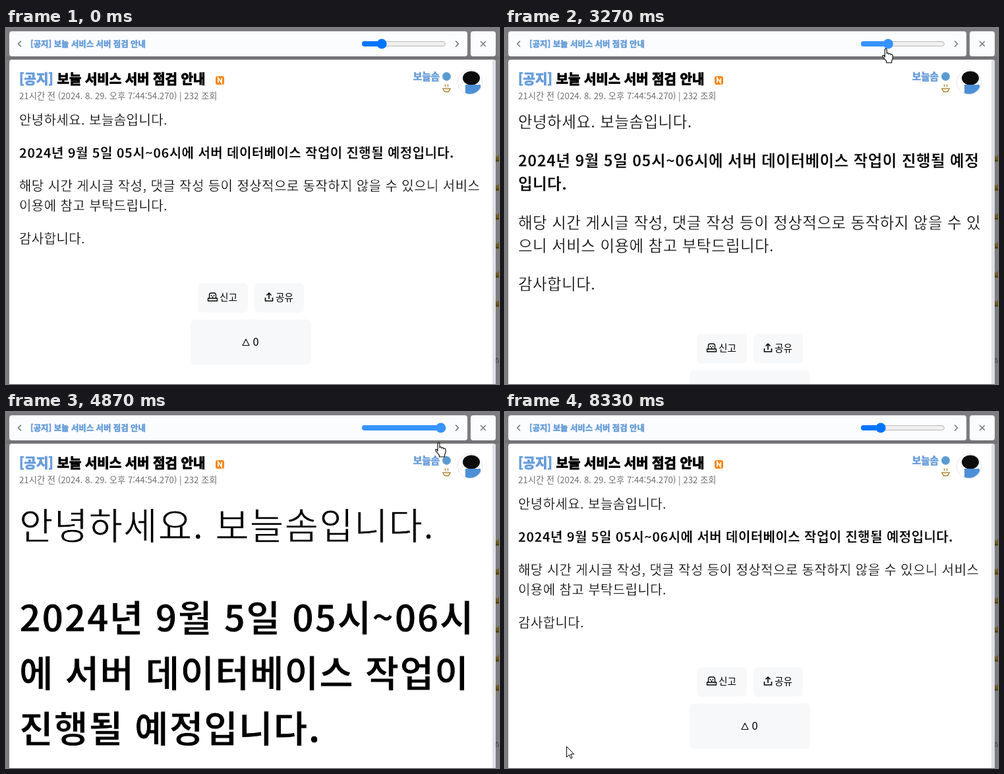
These frames come from a looping animation (748x540 px, 8390 ms). An HTML page:

```html
<!DOCTYPE html>
<html lang="ko">
<head>
<meta charset="utf-8">
<title>공지</title>
<style>
html, body { margin: 0; width: 100%; height: 100%; overflow: hidden; background: #7d7d7f; }
#stage { position: relative; width: 748px; height: 540px; overflow: hidden; }
svg { position: absolute; left: 0; top: 0; }
text, #post { font-family: 'Noto Sans CJK KR', 'Noto Sans CJK', 'Noto Sans', sans-serif; }
/* the white stroke thins the letters to a light weight */
#post {
  position: absolute; left: 20px; top: 122.3px; width: 709px; box-sizing: border-box;
  padding: .08em 0 1.59em; line-height: 1.5; letter-spacing: .021em; font-weight: 300; color: #000;
  -webkit-text-stroke: .016em #fff;
}
#post p { margin: 0 0 1em; }
#post p:last-child { margin: 0; }
#post b { font-weight: 600; }
.heavy { font-weight: 900; stroke-width: 1; paint-order: stroke; stroke-linejoin: round; }
.blue { fill: #669cda; stroke: #669cda; }
.black { fill: #000; stroke: #000; }
.line { fill: none; stroke: #6a6a6a; stroke-width: 1.3; stroke-linecap: round; stroke-linejoin: round; }
.ink { fill: none; stroke: #000; stroke-width: 1.3; stroke-linejoin: round; }
.gold { fill: none; stroke: #b5893c; stroke-width: 1.4; stroke-linecap: round; }
</style>
</head>
<body>
<div id="stage">
  <svg width="748" height="540">
    <rect width="748" height="540" fill="#7d7d7f"/>
    <rect y="43" width="748" height="5" fill="#747476"/>
    <g id="edge"></g>
    <rect x="5" y="5" width="695" height="38" rx="4" fill="#fbfcfe"/>
    <rect x="705" y="5" width="38" height="38" rx="4" fill="#fbfcfe"/>
    <rect x="5" y="48" width="738" height="520" rx="4" fill="#fff"/>
    <rect id="bar" x="738" y="49" width="5" height="500" fill="#dde0e6"/>
  </svg>
  <div id="post">
    <p>안녕하세요. 보늘솜입니다.</p>
    <p><b>2024년 9월 5일 05시~06시에 서버 데이터베이스 작업이 진행될 예정입니다.</b></p>
    <p>해당 시간 게시글 작성, 댓글 작성 등이 정상적으로 동작하지 않을 수 있으니 서비스 이용에 참고 부탁드립니다.</p>
    <p>감사합니다.</p>
  </div>
  <svg width="748" height="540">
    <defs>
      <clipPath id="face"><circle cx="704" cy="82" r="18"/></clipPath>
      <g id="bowl" class="gold">
        <path d="M-6 0H6M-5 1Q-4 5 0 5T5 1M-2-6V-3M2-6V-3"/>
      </g>
    </defs>
    <path class="line" d="M22.5 20l-4 4 4 4M682.5 20l4 4-4 4M720.5 20.5l7 7M727.5 20.5l-7 7"/>
    <text class="heavy blue" x="37" y="28.6" font-size="12.4" style="stroke-width:.6">[공지] 보늘 서비스 서버 점검 안내</text>

    <rect x="540.5" y="20.5" width="126" height="7" rx="3.5" fill="#efefef" stroke="#b9b9b9"/>
    <g id="slider">
      <rect id="fill" x="540" y="20" height="8" rx="4"/>
      <circle id="thumb" cy="24" r="7.6"/>
    </g>

    <text class="heavy" x="20" y="85.4" font-size="20"><tspan class="blue">[공지]</tspan><tspan class="black"> 보늘 서비스 서버 점검 안내</tspan></text>
    <rect x="318" y="73" width="13" height="13" rx="3" fill="#f7891c"/>
    <path d="M322 83v-7l5 7v-7" fill="none" stroke="#fff" stroke-width="1.7"/>
    <text x="20" y="108.4" font-size="13.25" font-weight="400" fill="#707070">21시간 전 (2024. 8. 29. 오후 7:44:54.270) | 232 조회</text>

    <g id="user">
      <text class="heavy blue" x="658" y="78.6" font-size="14.6" text-anchor="end" style="stroke-width:.6">보늘솜</text>
      <circle cx="668.5" cy="73.5" r="6.5" fill="#5b9bd0"/>
      <use href="#bowl" x="668.5" y="92"/>
      <circle cx="704" cy="82" r="18.5" fill="#fff" stroke="#e3e6ea"/>
      <g clip-path="url(#face)">
        <ellipse cx="706" cy="76" rx="13" ry="10.5" fill="#0c0c0c"/>
        <rect x="697" y="86" width="23" height="14" fill="#4d8fd6"/>
      </g>
    </g>
    <g id="foot"></g>
    <path id="hand" fill="#fff" stroke="#000" stroke-width="1.1" stroke-linejoin="round"
      d="M4 13.5V2.2C4 .1 7 .1 7 2.2V8.3c.2-1.8 3-1.6 3 .2v.6c.4-1.6 3-1.4 3 .3v.7c.5-1.4 3-1 3 .8V15c0 2-1.5 3-1.5 4.5V22H6.5v-2C5 17.5 2.5 15.5.8 12.8c-1-1.8 1-3 2.2-1.6z"/>
    <path id="arrow" fill="#fff" stroke="#000" stroke-linejoin="round"
      d="M.5.5V16.5L4.3 12.9l2.6 5.6 2.2-1-2.5-5.5h5.1z"/>
  </svg>
</div>
<script>
const $ = id => document.getElementById(id);
const set = (id, attrs) => { for (const k in attrs) $(id).setAttribute(k, attrs[k]); };

const LOOP = 8390, FPS = 0.015;
const GRAB = 1000, DROP = 6870;

// pointer path: time, x, y
const path = [
  [70, 150, 480], [1000, 570, 26], [1700, 557, 25], [2000, 548, 24], [2200, 546, 24],
  [2470, 546, 24], [2530, 546.5, 24.5], [2800, 546.5, 24.5], [3733, 609, 37], [4867, 656.5, 46],
  [5200, 656.5, 46], [5800, 605, 46], [6400, 568, 42], [6533, 568, 42], [6870, 568, 42],
  [7300, 72, 532], [7470, 92, 511], [8130, 92, 511], [8333, 93, 507]
];

function pointer(t) {
  let i = 1;
  while (i < path.length - 1 && path[i][0] < t) i++;
  const [a, ax, ay] = path[i - 1], [b, bx, by] = path[i];
  let p = Math.min(1, Math.max(0, (t - a) / (b - a)));
  if (t < GRAB || t > DROP) p = p * p * (3 - 2 * p);
  return [ax + (bx - ax) * p, ay + (by - ay) * p];
}

const rect = (x, y, w, h, r, fill, stroke = 'none') =>
  `<rect x="${x}" y="${y}" width="${w}" height="${h}" rx="${r}" fill="${fill}" stroke="${stroke}"/>`;
const label = (x, y, size, str, extra = '') =>
  `<text x="${x}" y="${y}" font-size="${size}" ${extra}>${str}</text>`;

function badge(i, x, y) {
  const tone = ['#fff', '#fff', '#fff', '#e9b95a', '#4c5550', '#d8d3d6', '#7a1f35', '#c9c4c0', '#fff', '#9a4a35'][i];
  if (i === 6) return `<g fill="none" stroke="${tone}" stroke-width="2"><circle cx="${x - 3}" cy="${y}" r="2.5"/><circle cx="${x + 3}" cy="${y}" r="2.5"/></g>`;
  if (i === 8) return `<path class="ink" style="stroke-width:1" d="M${x - 5} ${y - 5}q5 2 10 0 2 4-1 7l-1 4h-1l-2-4-2 4h-1l-1-4q-3-3-1-7z"/>`;
  if (i === 9) return `<circle cx="${x}" cy="${y - 2}" r="5" fill="${tone}"/><path d="M${x} ${y + 3}l-2 5" stroke="${tone}"/>`;
  const eyes = `<path d="M${x - 3} ${y - 3}v2M${x + 3} ${y - 3}v2M${x - 4} ${y + 2}q4 4 8 0" fill="none" stroke="#222"/>`;
  return rect(x - 7, y - 7, 14, 14, 5, tone, i < 3 ? '#333' : '#8a7a6a') + eyes;
}

// buttons and profile card; extra is the room gained without a scrollbar
function footer(extra) {
  const c = 371.5 + extra / 2, w = 703 + extra, cw = (w - 62) / 3;
  const col = i => 41 + i * (cw + 10);
  const bg = '#f7f8fa', bold = 'font-weight="500"';
  const icon = c - 65;
  let s = rect(c - 80.5, 0, 76, 45, 7, bg) + rect(c + 5.5, 0, 75, 45, 7, bg) + rect(c - 91.5, 55, 183, 69, 7, bg);
  s += `<path class="ink" d="M${icon + 2} 23v-5q0-3 3-3h4q3 0 3 3v5M${icon} 23h14v4h-14zM${icon + 5} 18v2M${icon + 9} 18v2M${icon + 7} 20v3"/>`;
  s += `<path class="ink" style="stroke-width:1.6" d="M${c + 22} 22v5h11v-5M${c + 27.5} 24v-9M${c + 24} 18.5l3.5-3.5 3.5 3.5"/>`;
  s += label(c - 47.5, 27, 14.7, '신고', bold) + label(c + 37.5, 27, 14.7, '공유', bold);
  s += `<path class="ink" style="stroke-width:1.1" d="M${c - 12.5} 94.5l5-9.5 5 9.5z"/>` + label(c + 3, 95, 16.5, '0');
  s += rect(20.5, 154.5, w - 1, 400, 8, '#f4f5f8', '#dcdfe4');
  ['프로필 사진', '전체 활동량', '보유 뱃지'].forEach((str, i) => {
    s += label(col(i) + cw / 2, 188.5, 12.6, str, 'text-anchor="middle" font-weight="700"');
    s += rect(col(i) + .5, 198.5, cw - 1, 260, 6, '#fff', '#dcdfe4');
  });
  s += `<path d="M${col(0) + 28} 250Q${col(0) + 30} 215 ${col(0) + 50} 199H${col(0) + 125}Q${col(0) + 168} 215 ${col(0) + 174} 250z" fill="#0c0c0c"/>`;
  const x = col(1) + 11, grey = 'fill="#777"';
  s += label(x, 220, 13.2, '<tspan font-weight="700">활동 레벨:</tspan>', grey);
  s += `<use href="#bowl" x="${x + 61}" y="216"/>` + label(x + 69, 220, 13.4, '(2,904 Exp)', grey);
  s += label(x, 240, 13.2, '<tspan font-weight="700">가입일:</tspan> 2019-12-10', grey);
  for (let i = 0; i < 10; i++) s += badge(i, col(2) + 19 + (i % 9) * 21, i < 9 ? 214 : 235);
  return s;
}

let crowns = '';
for (let y = 197; y < 420; y += 44)
  crowns += `<path d="M742 ${y - 5}l3 4 3-4v11h-6z" fill="#6d5a22"/><path d="M742 ${y + 4}h6" stroke="#2d2510"/>`;
$('edge').innerHTML = crowns + '<path d="M742 507l3-7 3 7z" fill="none" stroke="#444"/>';

let step = -1, room = -1;
function resize(n) {
  if (n === step) return;
  step = n;
  const f = n / 10, extra = n ? 0 : 5, post = $('post');
  post.style.fontSize = 14 + 27 * f + 15 * f * f + 'px';
  if (extra !== room) {
    room = extra;
    $('foot').innerHTML = footer(extra);
    set('user', { transform: `translate(${extra})` });
    set('bar', { visibility: extra ? 'hidden' : 'visible' });
  }
  set('foot', { transform: `translate(0 ${Math.round(143.7 + post.getBoundingClientRect().height)})` });
  const x = 547.7 + 112 * f;
  set('thumb', { cx: x });
  set('fill', { width: x - 540 });
}

function draw(ms) {
  const t = Math.floor((ms % LOOP + 4) * FPS) / FPS;
  const [x, y] = pointer(t);
  const drag = t >= GRAB - 1 && t < DROP - 5;
  const n = Math.round((x - 548.5) / 11.2);
  resize(drag ? Math.max(0, Math.min(10, n)) : 2);
  set('slider', { fill: drag ? '#3793ff' : '#0075ff' });
  set('hand', { transform: `translate(${x - 5.5} ${y})`, visibility: drag ? 'visible' : 'hidden' });
  set('arrow', { transform: `translate(${x} ${y})`, visibility: drag || t < 60 ? 'hidden' : 'visible' });
}

let start;
function tick(now) {
  if (start === undefined) start = now;
  draw(now - start);
  requestAnimationFrame(tick);
}
draw(0);
requestAnimationFrame(tick);
</script>
</body>
</html>
```
